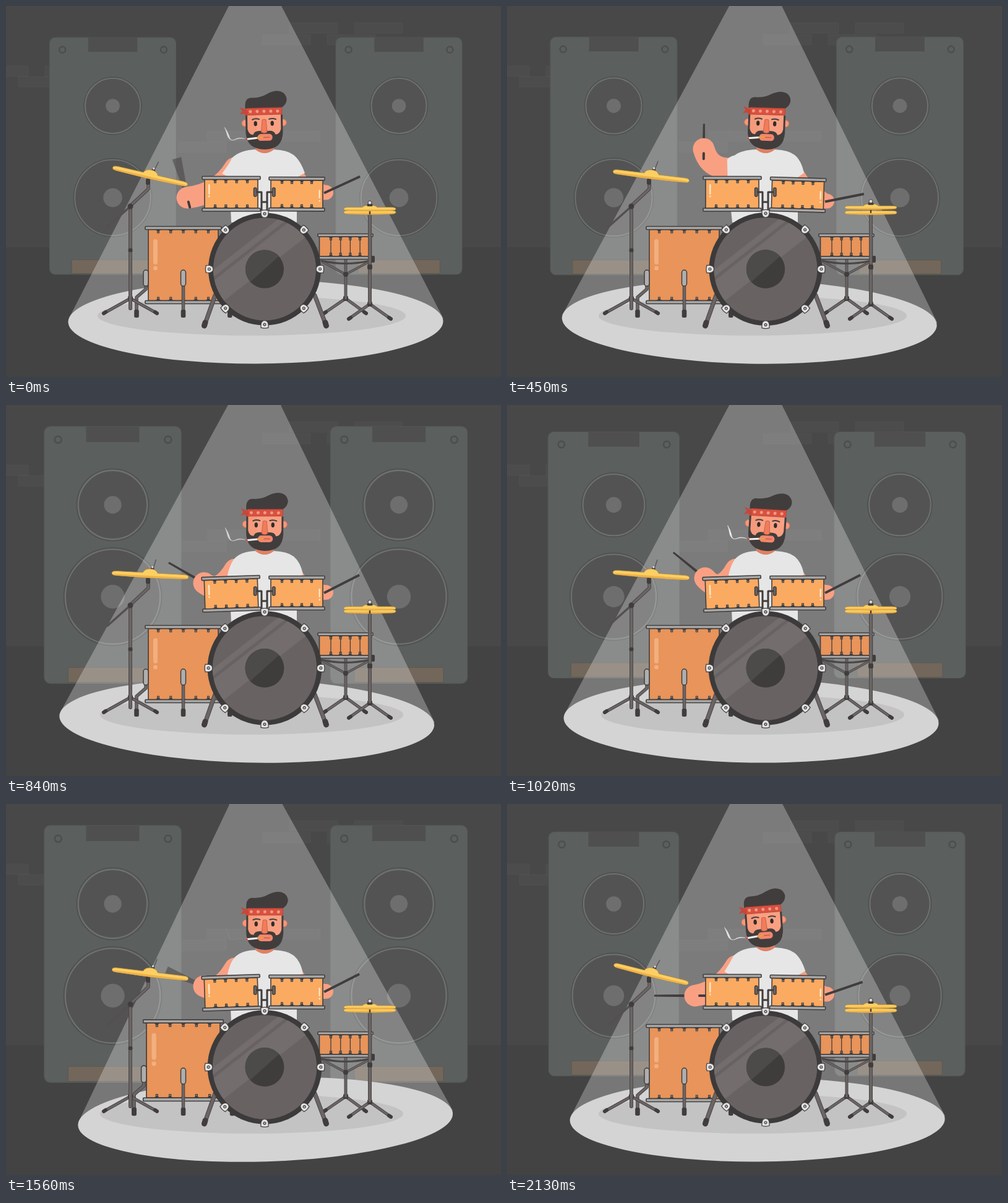
Write an HTML page that moves like this. It is 800 px wide and 600 px high and loops after 2160 ms.

```html
<!DOCTYPE html>
<html lang="en">
<head>
<meta charset="utf-8">
<title>Drummer</title>
<style>
html, body { margin: 0; width: 100%; height: 100%; overflow: hidden; background: #484848; }
svg { display: block; width: 800px; height: 600px; }
</style>
</head>
<body>
<svg id="stage" viewBox="0 0 800 600" xmlns="http://www.w3.org/2000/svg"></svg>
<script>
const INK = '#413d3d', TUBE = '#6b6565', SKIN = '#f9a083', ORANGE = '#e8945a', LIGHT_ORANGE = '#fbaa61';
const stage = document.getElementById('stage');

const rect = (x, y, w, h, fill, r = 0, more = '') =>
  `<rect x="${x}" y="${y}" width="${w}" height="${h}" rx="${r}" fill="${fill}" ${more}/>`;
const circle = (x, y, r, fill, more = '') => `<circle cx="${x}" cy="${y}" r="${r}" fill="${fill}" ${more}/>`;
const ellipse = (x, y, rx, ry, fill, more = '') =>
  `<ellipse cx="${x}" cy="${y}" rx="${rx}" ry="${ry}" fill="${fill}" ${more}/>`;
const path = (d, fill, more = '') => `<path d="${d}" fill="${fill}" ${more}/>`;
const line = (d, color, w, more = '') =>
  path(d, 'none', `stroke="${color}" stroke-width="${w}" stroke-linecap="round" stroke-linejoin="round" ${more}`);
const group = (id, body, more = '') => `<g id="${id}" ${more}>${body}</g>`;
const outline = (w = 1.5, color = INK) => `stroke="${color}" stroke-width="${w}"`;
const tube = (d, w = 5) => line(d, '#4b4646', w) + line(d, TUBE, w - 2);
const repeat = (n, make) => Array.from({ length: n }, (_, i) => make(i)).join('');

const brick = (x, y) => rect(x, y, 78, 17, '#fff', 1, 'fill-opacity=".025" stroke="#fff" stroke-opacity=".025"');
const brickRow = (x, y, n = 1) => repeat(n, i => brick(x + 105 * i, y));

function cone(id, y, r) {
  return group(id, circle(0, 0, r, '#505252') +
    circle(0, 0, r - 2.6, '#535353', outline(1.8, '#6f7170')) +
    circle(0, 0, r * .24, '#6e6e6e'), `data-y="${y}"`);
}

function speaker(i) {
  const screw = x => circle(x, -171, 5, '#5c5f5e', outline(2.5, '#4d4f4f'));
  return group('box' + i, rect(-101.5, -190.5, 203, 381, '#5b5f5e', 9, outline(1, '#555957')) +
    rect(-39.5, -190.5, 79, 23, '#4f4f4f') + screw(-81) + screw(82) +
    rect(-66, 167, 132, 22, '#72675a', 0, outline(.8, '#5c564e'))) +
    cone('tweeter' + i, 161.5, 46.5) + cone('woofer' + i, 310, 63);
}

function lug(x, y, dir) {
  return path(`M${x - 5} ${y}h10l-3 ${2 * dir}v${4 * dir}h-4v${-4 * dir}z`, INK) +
    circle(x, y + 4 * dir, .9, '#999');
}

function drum({ x, y, w, h, inset, fill, lugs, hoop = 5 }) {
  const rim = top => rect(x, top, w, hoop, '#a9a9a9', 1, outline(1.6));
  const lugPair = i => {
    const lx = x + 21 + i * (w - 42) / (lugs - 1);
    return lug(lx, y + hoop, 1) + lug(lx, y + h - hoop, -1);
  };
  return rect(x + inset, y + hoop, w - 2 * inset, h - 2 * hoop, fill, 0, outline(1.6)) +
    repeat(lugs, lugPair) + rim(y) + rim(y + h - hoop);
}

function tripod(x, y, left, right) {
  const foot = fx => line(`M${fx} ${y + 24}l${fx < x ? 3 : -3} -2`, INK, 6);
  return tube(`M${x} ${y}L${left} ${y + 24}M${x} ${y}L${right} ${y + 24}`) +
    foot(left) + foot(right) + rect(x - 4, y - 4, 8, 8, INK, 2);
}

// A cymbal seen from the side: a flat plate of half width w with a bell.
const plate = (w, bell, t = 3.5) =>
  path(`M${-w} 0Q${-w} ${-t} ${8 - w} ${-t}H-12Q-9 ${-bell} 0 ${-bell}Q9 ${-bell} 12 ${-t}H${w - 8}
    Q${w} ${-t} ${w} 0Q${w} ${t} ${w - 6} ${t}Q0 ${t + 2} ${6 - w} ${t}Q${-w} ${t} ${-w} 0z`, '#fbcf63', outline(.8, '#b98a3c')) +
  path(`M${2 - w} ${t / 3}H${w - 2}L${w - 6} ${t}Q0 ${t + 2} ${6 - w} ${t}z`, '#eeb248');

function leg(x, bent) {
  const fx = bent ? x - 15 : x;
  return tube(bent ? `M${x} 452V458L${fx} 471V496` : `M${x} 452V496`, 5.5) +
    rect(fx - 3.8, 491, 7.6, 13, INK, 2.5) + rect(x - 4, 427, 8, 26, '#aeaeae', 4, outline());
}

function bassDrum() {
  const clamp = i => `<g transform="rotate(${45 * i}) translate(0 -90)">` +
    path('M-6 -4.5Q0 -6.5 6 -4.5V1Q5 7 0 7Q-5 7 -6 1z', '#e2e2e2', outline(1.2)) +
    circle(0, .5, 2, '#bbb', outline(1.2)) + '</g>';
  return circle(0, 0, 91, '#3c3a3a') + circle(0, 0, 83, '#696262') +
    `<g clip-path="url(#skin)"><g transform="rotate(-38)">` +
    rect(-90, -36, 180, 36, '#736d6d') + rect(-90, -50, 180, 9, '#736d6d') + '</g></g>' +
    circle(0, 0, 31, '#3f3d3c') +
    path('M-31 0A31 31 0 0 1 31 0z', '#4c4b4a', 'transform="rotate(-42)"') + repeat(8, clamp);
}

function head() {
  const ear = x => circle(x, 189, 5.5, '#f8977a', outline(1, '#d9785e'));
  const eye = x => ellipse(x, 190, 2.7, 4, '#302c2c');
  return ear(387.5) + ear(448.5) + rect(389, 166, 58, 48, SKIN) + rect(389, 176, 16, 32, '#f1906f', 0, 'opacity=".4"') +
    path('M388 166Q386 149 397 148Q412 149 424 142Q440 134 450 141Q459 150 452 160Q447 166 440 167z', INK) +
    path(`M388 176H391V199Q393 208 400 208Q402 201 412 202Q418 200 424 202Q434 201 436 208Q443 208 445 199V176H448V205
      Q447 232 418 232Q389 231 388 205z`, INK) +
    rect(407, 207, 24, 11, '#f2866c', 5) + line('M412 212.5H426', '#b5513e', 1) +
    path('M415 184Q418 182.5 421 184L422.5 204Q418 207 413 204z', '#f17c5b', outline(.9, '#c35e45')) +
    eye(404) + eye(431) + line('M399 183.5Q404 181 410 183M426 183Q432 181 437 183.5', INK, 2) +
    path('M390 165L447 164.5V175.5L390 176z', '#d9513f', outline(.8, '#b23e31')) +
    repeat(5, i => circle(396 + 11 * i, 170.3, 2.5, '#f09a86')) +
    path('M391 168L379 163L383 169L379 175L386 173L388 178L392 173z', '#c94636') +
    line('M389 215L407 213', '#f5f1ee', 3) + line('M407 213L415 212', '#e99b4f', 3) + circle(389, 215, 1.6, '#c8402f') +
    group('smoke', path('M386 214Q376 211 370 215Q363 219 361 209Q359 202 354 195Q357 203 358 208Q361 217 368 216Q377 212 386 214z',
      '#eee', outline(.5, '#eee')));
}

stage.innerHTML = `<defs><clipPath id="skin"><circle r="83"/></clipPath></defs>` +
  rect(0, 0, 800, 600, '#484848') + rect(0, 390, 800, 210, '#434343') +
  brickRow(458, 27, 2) + brickRow(414, 46, 2) + brickRow(-42, 97, 2) + brickRow(20, 114) + brickRow(325, 202, 2) + brickRow(278, 220) +
  speaker(0) + speaker(1) +
  group('spot', path('M347 -25L360 0L100 506Q402 560 706 506L445 0L458 -25z', '#fff', 'opacity=".28"') +
    ellipse(402.5, 510.5, 303, 68, '#d4d4d4')) +
  ellipse(397, 501, 249, 32, '#c3c3c3', 'id="shadow"') +
  group('body',
    line('', SKIN, 24, 'id="rightArm"') + path('', INK, 'id="rightStick"') +
    path('', INK, 'id="leftStick"') + line('', SKIN, 35, 'id="leftArm"') + line('', INK, 4, 'id="leftStub"') +
    path('', '#e6e6e6', 'id="shirt"') +
    path('M403 232Q418 244 433 232V226H403z', '#df8164') + group('head', head())) +
  group('floorTom', drum({ x: 225, y: 356.5, w: 123, h: 125, inset: 5, fill: ORANGE, lugs: 5 }) +
    rect(238, 377, 7, 41, '#f2af80', 3.5) + circle(241.5, 424, 3.5, '#f2af80') + leg(226, true) +
    rect(358, 491, 7.6, 13, INK, 2.5)) + leg(286.5) +
  tripod(201, 473, 158, 244) + tube('M201 324V489', 6) + line('M164 357L200 325', '#555050', 3.5) +
  tube('M201 323L230 296V284', 5.5) + circle(201, 324, 4.5, INK) + rect(197.5, 392, 7, 6, INK, 2) +
  rect(226, 279, 7, 10, INK, 2) +
  group('crash', line('M4 -9L8 -25', '#555', 1.4) + circle(3, -10, 3, INK) + circle(3, -13, 1.6, '#ddd') + plate(62, 10)) +
  tripod(549, 473, 514, 582) + tube('M549 410V473') +
  tube('M512 414L549 434L586 414', 4) + line('M510 412Q549 421 588 412', '#4b4646', 3) + circle(549, 434, 4, INK) +
  group('snare', drum({ x: 504, y: 368.5, w: 89, h: 41, inset: 2.5, fill: ORANGE, hoop: 4.5, lugs: 4 }) +
    repeat(4, i => line(`M${525 + 15.7 * i} 378V400`, INK, 1.3)) + rect(590, 404, 6, 11, INK, 2)) +
  group('burst', repeat(7, i => {
    const a = -(17 + 31.5 * i) * Math.PI / 180;
    return circle(Math.cos(a), Math.sin(a), .08, '#f0f0f0');
  })) +
  tripod(588, 482, 554, 622) + tube('M588 338V480', 6) + rect(584, 418, 8, 8, INK, 2) +
  group('lowHat', plate(42, 3, 2.7)) +
  group('highHat', line('M0 -6V8', INK, 2.4) + plate(42, 6, 2.5) + rect(-4.5, -8, 9, 4, INK, 1.5) + circle(0, -10, 3, '#d6d6d6', outline(1))) +
  tube('M338 468L322 513', 7) + tube('M499 468L516 513', 7) +
  line('M322 512L320.5 517M516 512L517.5 517', INK, 9) +
  group('leftTom', drum({ x: 317, y: 275.5, w: 94, h: 56.5, inset: 4, fill: LIGHT_ORANGE, lugs: 4 }) +
    rect(327, 288, 2.6, 17, '#ffe3c4', 1.3) + circle(328.3, 308, 1.4, '#ffe3c4')) +
  group('rightTom', drum({ x: 425, y: 276.5, w: 90, h: 55, inset: 3, fill: LIGHT_ORANGE, lugs: 4 }) +
    rect(505.5, 297, 2.6, 14, '#ffe3c4', 1.3) + circle(506.8, 315, 1.4, '#ffe3c4')) +
  line('M404 301H413V332M432 301H422V332M413 317H422', INK, 3) +
  rect(400.5, 294, 4.5, 14, '#6a6565', 2, outline()) + rect(430.5, 294, 4.5, 14, '#6a6565', 2, outline()) +
  group('bass', bassDrum());

const LOOP = 60, BAR = 20;

// Smooth bump that peaks at a given step, repeating every period.
function pulse(step, peak, rise, fall, period = LOOP) {
  const d = ((step - peak + rise) % period + period) % period - rise;
  const u = Math.max(0, d < 0 ? 1 + d / rise : 1 - d / fall);
  return u * u * (3 - 2 * u);
}

const el = Object.fromEntries([...stage.querySelectorAll('[id]')].map(e => [e.id, e]));
const place = (id, value) => el[id].setAttribute('transform', value);
const shape = (id, d) => el[id].setAttribute('d', d);
const grow = (id, x, y, s) => place(id, `translate(${x} ${y}) scale(${s}) translate(${-x} ${-y})`);

// A stick from (x, y) at an angle in degrees, with half widths at both ends.
function stick(x, y, angle, length, base, tip) {
  const a = angle * Math.PI / 180, c = Math.cos(a), s = Math.sin(a);
  const at = (along, side) => `${x + c * along - s * side} ${y + s * along + c * side}`;
  return `M${at(0, base)}L${at(length, tip)}L${at(length, -tip)}L${at(0, -base)}z`;
}

function drawScene(step) {
  const boom = pulse(step, 3, 3, 10, BAR) + pulse(step, 17, 6, 3.5, BAR);
  for (let i = 0; i < 2; i++) {
    const x = 172.5 + 462.5 * i;
    place('box' + i, `translate(${x} 242.5) scale(${1 + .09 * boom})`);
    for (const name of ['tweeter', 'woofer'])
      place(name + i, `translate(${x} ${el[name + i].dataset.y}) scale(${1 + .27 * boom})`);
  }
  place('spot', `rotate(${1.42 - 3.3 * pulse(step, 39, 15, 40)} 402.5 -25)`);
}

function drawDrums(step, { leftHit, rightHit, snareHit, sideHit }) {
  const floorHit = pulse(step, 43, 4, 6) + pulse(step, 53, 3, 5);
  const crash = 7 + 7 * pulse(step, 59, 3, 4) - 4.5 * pulse(step, 17, 3, 26);
  const hat = 7 * snareHit + 5.4 * rightHit;
  place('crash', `translate(233 275) rotate(${crash})`);
  place('lowHat', `translate(588 ${333.5 + hat * .15})`);
  place('highHat', `translate(588 ${328.5 - hat})`);
  place('bass', `translate(418 425.5) scale(${1 + .03 * leftHit + .012 * rightHit})`);
  grow('snare', 548.5, 409, 1 + .07 * snareHit + .05 * sideHit);
  grow('floorTom', 286.5, 500, 1 + .053 * floorHit);
  place('leftTom', `rotate(${-3.8 * leftHit} 411 303)`);
  place('rightTom', `rotate(${3.2 * rightHit} 425 303)`);

  const age = step - 3;
  place('burst', `translate(557 372) scale(${8 + 4 * age})`);
  el.burst.setAttribute('opacity', age > 0 && age < 6 ? 1 : 0);
}

function drawDrummer(step, { leftHit, rightHit, snareHit, sideHit }) {
  place('body', `translate(0 ${8 * leftHit})`);
  el.shadow.setAttribute('rx', 249 - 8 * leftHit);
  place('head', `rotate(${4 * pulse(step, 7, 5, 11, BAR) - 4 * pulse(step, 19, 3, 1.5, BAR)} 418 232)`);
  el.smoke.setAttribute('opacity', pulse(step, 28, 17, 8, 30));

  const raise = pulse(step, 6, 6, 18), flick = pulse(step, 0, 1, 4), blur = flick + pulse(step, 43, 2, 3);
  const lift = 105 * raise + 35 * pulse(step, 30, 20, 28);
  const x = 320 - 32 * pulse(step, 1, 4, 13), y = 310 - lift;
  const angle = 180 + 1.15 * lift + 75 * flick;
  shape('leftArm', `M370 262Q${345 - 23 * raise} ${304 - 48 * raise} ${x} ${y}`);
  shape('leftStick', stick(x, y, angle, 66 - 46 * raise * raise, 2.2, 1.5 + 6 * blur));
  el.leftStick.setAttribute('opacity', 1 - .5 * Math.min(1, blur));
  const a = angle * Math.PI / 180;
  shape('leftStub', `M${x - 7 * Math.cos(a)} ${y - 7 * Math.sin(a)}l${-9 * Math.cos(a)} ${-9 * Math.sin(a)}`);

  const drop = 33 * rightHit + 34 * snareHit;
  const gx = 514 - 15 * Math.max(snareHit, sideHit), gy = 299 + drop;
  shape('rightArm', `M462 262L480 290L${gx} ${gy}h3`);
  shape('rightStick', stick(gx, gy + 1, -27 + .95 * drop, 64, 2, 2));

  const flare = pulse(step, 0, 3, 6), sleeve = 358 - 9 * flare - 3 * raise;
  shape('shirt', `M403 232Q378 233 ${368 - 3 * flare} ${246 - 6 * raise}Q362 ${254 - 16 * raise} ${sleeve} ${271 - 31 * raise}
    L${361 - 6 * raise} 277L364 350H470V277L${480 + 3 * flare} 270Q476 250 465 241Q455 233 433 232Q418 243 403 232z`);
}

function render(step) {
  const hits = {
    leftHit: pulse(step, 5, 4, 6, BAR),
    rightHit: pulse(step, 15, 6, 6, BAR),
    snareHit: pulse(step, 6, 3, 5),
    sideHit: pulse(step, 53, 3, 4)
  };
  drawScene(step);
  drawDrummer(step, hits);
  drawDrums(step, hits);
}

// Five poses every 180 ms; the first of each five is held twice as long.
function tick() {
  const t = performance.now() % 2160, r = t % 180;
  render(5 * Math.floor(t / 180) + Math.max(0, Math.floor(r / 30) - 1));
  requestAnimationFrame(tick);
}
tick();
</script>
</body>
</html>
```
